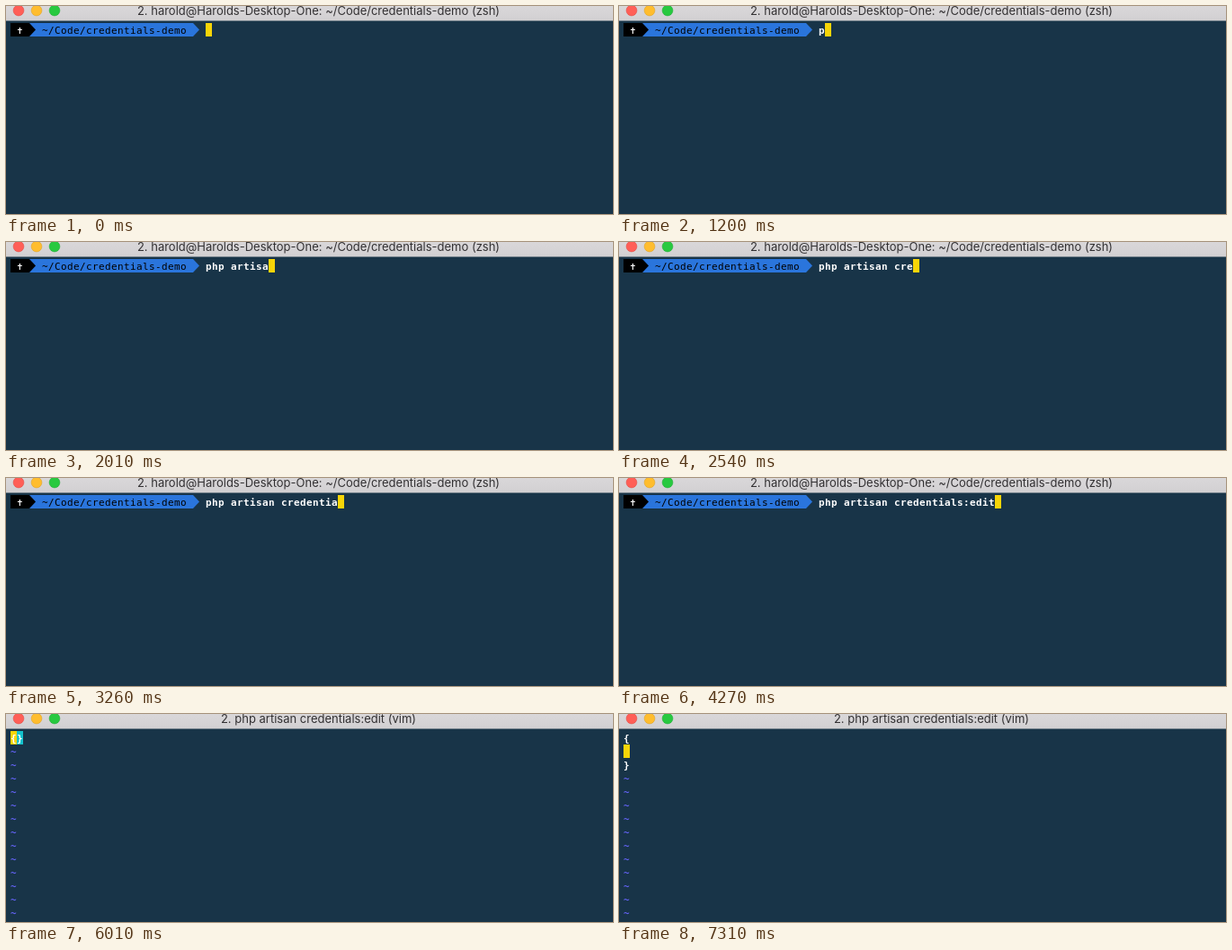
An HTML page for the animation above (8000 ms loop, 675x232 px).

```html
<!DOCTYPE html>
<html lang="en">
<head>
<meta charset="utf-8">
<title>Terminal</title>
<style>
  html, body { margin: 0; width: 100%; height: 100%; overflow: hidden; background: #183448; }
  svg { display: block; width: 675px; height: 232px; }
  text { white-space: pre; }
  .title { font: 13px Inter, sans-serif; fill: #323032; text-anchor: middle; }
  /* 11px glyphs are 6.62px wide and sit on a 7px grid */
  .mono { font: bold 11px "DejaVu Sans Mono", monospace; letter-spacing: .378px; fill: #fff; }
  .path { font-weight: normal; fill: #000; }
  .tilde { fill: #6262f2; }
  .cursor { fill: #f7d508; }
  .match { fill: #14c1cc; }
</style>
</head>
<body>
<svg viewBox="0 0 675 232">
  <defs>
    <linearGradient id="bar" x2="0" y2="1">
      <stop offset="0" stop-color="#d9d7d9"/>
      <stop offset="1" stop-color="#d2d0d2"/>
    </linearGradient>
  </defs>
  <rect width="675" height="232" fill="#183448"/>
  <rect width="675" height="16" fill="url(#bar)"/>
  <rect y="16" width="675" height="1" fill="#74828c"/>
  <g stroke-width=".6">
    <circle cx="14" cy="5" r="5.9" fill="#ff5f57" stroke="#e24b43"/>
    <circle cx="34" cy="5" r="5.9" fill="#ffbd2e" stroke="#e1a325"/>
    <circle cx="54" cy="5" r="5.9" fill="#28c940" stroke="#1fae34"/>
  </g>
  <text id="title" class="title" x="347.5" y="10"></text>

  <g id="shell">
    <path d="M26 19H208L215 26.5L208 34H26Z" fill="#2a75dc"/>
    <path d="M5 19H26L33 26.5L26 34H5Z" fill="#000"/>
    <text class="mono" x="15.5" y="31" text-anchor="middle">✝</text>
    <text class="mono path" x="40" y="31">~/Code/credentials-demo</text>
    <text id="typed" class="mono" x="222" y="31"></text>
  </g>

  <g id="editor">
    <g id="tildes"></g>
    <g id="status" fill="#8b9ba5">
      <rect x="107" y="231" width="2" height="1"/>
      <rect x="490" y="231" width="4" height="1"/>
      <rect x="532" y="231" width="3" height="1"/>
    </g>
  </g>
  <rect id="match" class="match" width="7" height="15"/>
  <rect id="cursor" class="cursor" width="7" height="15"/>
  <g id="braces">
    <text id="open" class="mono">{</text>
    <text id="close" class="mono">}</text>
  </g>
</svg>
<script>
const LOOP = 8000;
const COMMAND = 'php artisan credentials:edit';
// Moment at which each typed character has appeared; 2540 brings two at once.
const KEYS = [
  1200, 1290, 1390, 1480, 1580, 1670, 1720, 1810, 1900,
  2010, 2110, 2200, 2300, 2540, 2540, 2720, 2780,
  2960, 3060, 3160, 3260, 3380, 3440,
  3680, 3860, 4040, 4100, 4270
];
const ENTER = 4390, OPEN = 4570, VIM = 5290, INSERT = 6010;

// Editor states: cells are [column, row].
const EDITS = [
  { at: OPEN, cursor: [0, 0], match: [1, 0], close: [1, 0] },
  { at: 6360, cursor: [1, 0], match: [0, 0], close: [1, 0] },
  { at: 6660, cursor: [0, 1], match: [0, 0], close: [0, 1] },
  { at: 6950, cursor: [0, 2], match: [0, 0], close: [0, 2] },
  { at: 7310, cursor: [0, 1], match: null, close: [0, 2] }
];

const $ = id => document.getElementById(id);
const show = (id, on) => $(id).setAttribute('visibility', on ? 'visible' : 'hidden');

function place(el, [col, row], drop = 0) {
  el.setAttribute('x', 5 + 7 * col);
  el.setAttribute('y', 19 + 15 * row + drop);
}

const tildes = [];
for (let row = 1; row <= 13; row++) {
  const el = document.createElementNS('http://www.w3.org/2000/svg', 'text');
  el.setAttribute('class', 'mono tilde');
  el.textContent = '~';
  place(el, [0, row], 12);
  $('tildes').append(el);
  tildes.push(el);
}
place($('open'), [0, 0], 12);

function titleAt(t) {
  if (t < ENTER) return '2. harold@Harolds-Desktop-One: ~/Code/credentials-demo (zsh)';
  const job = t < OPEN ? 'zsh' : t < VIM ? 'php' : 'vim';
  return `2. php artisan credentials:edit (${job})`;
}

function draw(t) {
  const editing = t >= OPEN;
  $('title').textContent = titleAt(t);
  show('shell', !editing);
  show('editor', editing);
  show('braces', editing);
  show('status', editing && t < INSERT);

  if (!editing) {
    const count = KEYS.filter(k => k <= t).length;
    $('typed').textContent = COMMAND.slice(0, count);
    place($('cursor'), t < ENTER ? [31 + count, 0] : [0, 1]);
    show('match', false);
    tildes.forEach(el => el.setAttribute('visibility', 'hidden'));
    return;
  }

  const state = EDITS.filter(e => e.at <= t).pop();
  place($('cursor'), state.cursor);
  place($('close'), state.close, 12);
  show('match', state.match);
  if (state.match) place($('match'), state.match);
  tildes.forEach((el, i) =>
    el.setAttribute('visibility', i + 1 > state.close[1] ? 'visible' : 'hidden'));
}

function tick() {
  draw(performance.now() % LOOP);
  requestAnimationFrame(tick);
}
tick();
</script>
</body>
</html>
```
